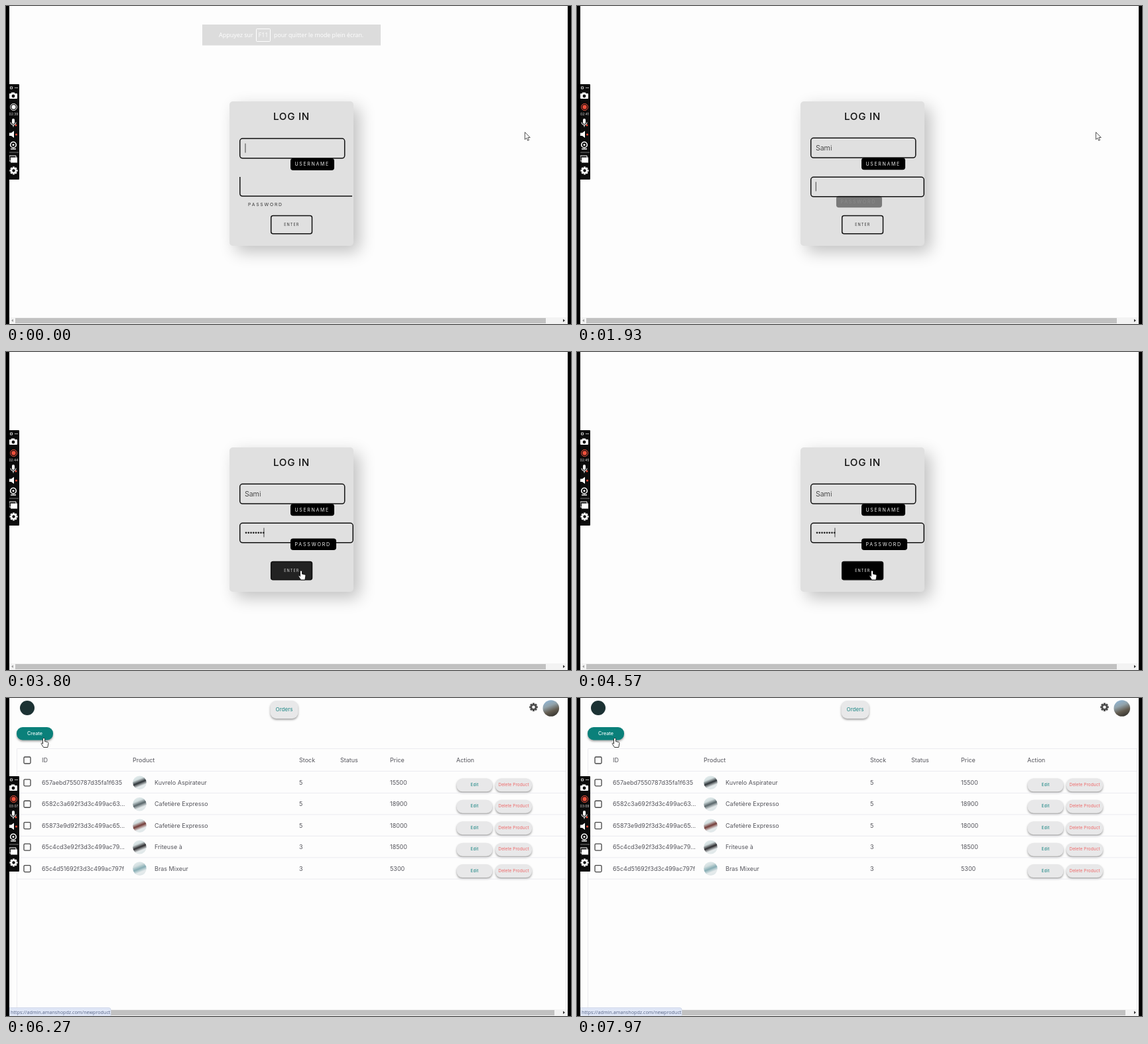
Write an HTML page with a canvas that moves like this. It is 852x480 px and loops after 8000 ms.

```html
<!DOCTYPE html>
<html lang="fr">
<head>
<meta charset="utf-8">
<title>Log in</title>
<style>
  html, body { margin: 0; width: 100%; height: 100%; overflow: hidden; background: #fdfdfd; }
  canvas { display: block; width: 852px; height: 480px; }
</style>
</head>
<body>
<canvas id="stage" width="852" height="480"></canvas>
<script>
const c = document.getElementById('stage').getContext('2d');
const LOOP = 8000, CUT = 5750;
const PAGE = '#fdfdfd', INK = '#111', CARD = '#e0e0e0', PALE = '#e8e8e9', LINE = '#ebebf0';
const SANS = 'Inter, sans-serif', UI = '"Open Sans", sans-serif';
const HAND = new Path2D('M0 0C1.2 0 1.5.8 1.5 1.6V5L5.3 5.9C6.5 6.2 7 7 6.9 8L5.8 14H-.4L-3.6 9C-4.4 7.6-2.8 7-2 8L-1.5 8.7V1.6C-1.5.8-1.2 0 0 0Z');
const ARROW = new Path2D('M0 0V11L2.5 8.7 4.3 12.7 6.1 11.9 4.4 8H7.8Z');

const clamp = v => Math.max(0, Math.min(1, v));
const span = (t, from, to) => clamp((t - from) / (to - from));
const ease = p => p * p * (3 - 2 * p);
const lerp = (a, b, p) => a + (b - a) * p;
const gray = p => { const v = Math.round(255 * p); return `rgb(${v},${v},${v})`; };

function box(x, y, w, h, r, fill, stroke, line = 1) {
  c.beginPath();
  c.roundRect(x, y, w, h, r);
  if (fill) { c.fillStyle = fill; c.fill(); }
  if (stroke) { c.strokeStyle = stroke; c.lineWidth = line; c.stroke(); }
}

function disc(x, y, r, fill, stroke, line = 1) {
  c.beginPath();
  c.arc(x, y, r, 0, 7);
  if (fill) { c.fillStyle = fill; c.fill(); }
  if (stroke) { c.strokeStyle = stroke; c.lineWidth = line; c.stroke(); }
}

// y is the vertical middle of the line
function text(s, x, y, size, color, { weight = 400, align = 'left', gap = 0, family = SANS } = {}) {
  c.font = `${weight} ${size}px ${family}`;
  c.letterSpacing = gap + 'px';
  c.textAlign = align;
  c.textBaseline = 'alphabetic';
  c.fillStyle = color;
  c.fillText(s, x, y + size * .36);
  return c.measureText(s).width;
}

function shape(path, x, y, fill, stroke) {
  c.save();
  c.translate(x, y);
  c.fillStyle = fill;
  c.fill(path);
  c.strokeStyle = stroke;
  c.lineWidth = .9;
  c.stroke(path);
  c.restore();
}

function polygon(fill, ...points) {
  c.beginPath();
  for (let i = 0; i < points.length; i += 2) c.lineTo(points[i], points[i + 1]);
  c.fillStyle = fill;
  c.fill();
}

function shadow(color, blur, dx, dy, draw) {
  c.save();
  Object.assign(c, { shadowColor: color, shadowBlur: blur, shadowOffsetX: dx, shadowOffsetY: dy });
  draw();
  c.restore();
}

function gear(x, y, r, fill, hole) {
  c.save();
  c.translate(x, y);
  c.fillStyle = fill;
  for (let i = 0; i < 4; i++, c.rotate(Math.PI / 4)) c.fillRect(-r * .24, -r, r * .48, r * 2);
  disc(0, 0, r * .76, fill);
  disc(0, 0, r * .36, hole);
  c.restore();
}

function photo(x, y, r, ...tones) {
  const g = c.createLinearGradient(x - r * .4, y - r, x + r * .4, y + r);
  tones.forEach((tone, i) => g.addColorStop(i / (tones.length - 1), tone));
  disc(x, y, r, g);
}

function scrollbar(end) {
  box(5, 470, 842, 10, 0, '#f3f3f3');
  box(14, 471, end - 14, 8, 0, '#c1c1c1');
  polygon('#a0a0a0', 11, 472.5, 11, 477, 8, 474.8);
  polygon('#333', 840, 472.5, 840, 477, 843, 474.8);
}

function toolbar(t) {
  const seconds = t < CUT ? 159 + Math.floor(t * .0015) : 187 + Math.floor((t - 6000) * .0015);
  const clock = '0' + Math.floor(seconds / 60) + ':' + String(seconds % 60).padStart(2, '0');
  const dark = '#0c0c0c', light = '#fff', red = '#f0503c';
  box(4, 118, 16, 144, 1, dark);
  box(6.5, 122, 3, 3, 0, null, light, .8);
  box(13, 123, 5, 1, 0, '#aaa');
  box(5, 132, 12, 8, 1, light);
  box(8, 130.5, 5, 2, 0, light);
  disc(11, 136, 2.4, dark);
  const rec = t < 1000 ? light : red;
  disc(11.5, 152.5, 5, null, rec, 1);
  disc(11.5, 152.5, 3.2, rec);
  text(clock, 11.5, 163.3, 5, '#ddd', { align: 'center' });
  box(9, 170, 4, 8, 2, light);
  c.beginPath();
  c.arc(11, 175.5, 4, 0, Math.PI);
  c.moveTo(11, 179.5);
  c.lineTo(11, 182.5);
  c.strokeStyle = light;
  c.lineWidth = 1.1;
  c.stroke();
  disc(15, 180, 1.4, red);
  polygon(light, 5, 191.5, 8, 191.5, 12, 188.5, 12, 199, 8, 196, 5, 196);
  disc(15.5, 194, 1.5, red);
  disc(11, 209.5, 4.3, null, light, 1.6);
  disc(11, 209.5, 1.5, light);
  box(7, 215, 8, 1.5, 0, light);
  box(5, 220.5, 14, 1, 0, '#777');
  box(5, 226, 10, 8, 0, null, light, 1);
  box(7, 228.5, 10, 8, 0, light);
  gear(11.5, 248.5, 6, light, dark);
}

function caret(x, y, since) {
  if (since % 700 < 350) box(x, y - 7, .9, 14, 0, '#333');
}

function banner(t) {
  c.globalAlpha = 1 - span(t, 0, 260);
  box(296, 28, 269, 31.5, 0, '#dcdcdc');
  text('Appuyez sur', 321, 44, 9, '#fff', { family: UI });
  box(377.5, 34.5, 21, 19, 1, null, '#fff');
  text('F11', 388, 44, 9, '#fff', { family: UI, align: 'center' });
  text('pour quitter le mode plein écran.', 404, 44, 8.8, '#fff', { family: UI });
  c.globalAlpha = 1;
}

function login(t) {
  const focused = t >= 1770;
  const lift = focused ? -.7 : 0;
  const label = ease(span(t, 1770, 2110));
  const hover = ease(span(t, 3620, 3860));

  scrollbar(814);
  shadow('rgba(0,0,0,.24)', 24, 9, 9, () => box(337, 144, 187, 218, 5, CARD));
  text('LOG IN', 430.5, 167 + lift, 15.2, INK, { weight: 500, align: 'center', gap: .7 });

  // username
  box(352.7, 200 + lift, 158, 29.8, 4, null, INK, 1.5);
  const letters = [480, 650, 930, 1100].filter(at => t >= at).length;
  const width = text('Sami'.slice(0, letters), 360, 215 + lift, 10.7, '#222', { weight: 300 });
  if (!focused) caret(360.5 + (letters && width), 214.5, t < 480 ? t : t - 650);
  box(429, 230 + lift, 66, 18, 4, '#000');
  text('USERNAME', 435.5, 238.8 + lift, 7, '#eee', { gap: 1.65 });

  // password
  if (focused) {
    box(352.7, 258.3, 170.5, 29.5, 4, null, INK, 1.5);
  } else {
    c.beginPath();
    c.moveTo(352.8, 258);
    c.lineTo(352.8, 283);
    c.quadraticCurveTo(352.8, 287, 357, 287);
    c.lineTo(522, 287);
    c.strokeStyle = INK;
    c.lineWidth = 1.5;
    c.stroke();
  }
  const dots = clamp((t - 2080) / 960) * 8 | 0;
  for (let i = 0; i < dots; i++) disc(362 + i * 3.75, 272.8, 1.35, '#222');
  if (focused && t < 5150) caret(dots ? 360.5 + dots * 3.5 : 359.8, 272.5, t < 3040 ? t - 1770 : t - 3040);
  const lx = lerp(358.5, 429, label), ly = lerp(300, 290.5, label);
  box(lx, ly - 9, 69, 17.5, 4, `rgba(0,0,0,${label})`);
  text('PASSWORD', lx + 6.5, ly, lerp(6.8, 7.1, label), gray(.2 + label * .75), { gap: 1.8 });

  // submit
  box(399.7, 316.5, 61.8, 27.3, 3, `rgba(0,0,0,${hover})`, INK, 1.5);
  text('ENTER', 430.8, 329.8, 5.5, gray(.2 + hover * .75), { align: 'center', gap: 1.05 });

  banner(t);

  const move = ease(span(t, 2620, 3680));
  const x = lerp(782.5, 445, move), y = lerp(190.5, 330, move);
  if (x < 462 && y > 316) shape(HAND, x, y, '#fff', '#111');
  else shape(ARROW, x, y, '#fff', '#444');
}

function pill(label, x, y, w, h, size, color, fill = PALE, weight = 400) {
  shadow('rgba(0,0,0,.35)', 3, 0, 2, () => box(x, y, w, h, 9, fill));
  text(label, x + w / 2, y + h / 2 - .8, size, color, { align: 'center', weight });
}

function rule(y) {
  c.beginPath();
  c.moveTo(16, y);
  c.lineTo(844, y);
  c.strokeStyle = LINE;
  c.lineWidth = 1;
  c.stroke();
}

const columns = [['ID', 54], ['Product', 191], ['Stock', 442], ['Status', 504], ['Price', 579], ['Action', 679]];
const products = [
  ['657aebd7550787d35fa1f635', 'Kuvrelo Aspirateur', 5, 15500, '#2e3438'],
  ['6582c3a692f3d3c499ac63...', 'Cafetière Expresso', 5, 18900, '#59666a'],
  ['65873e9d92f3d3c499ac65...', 'Cafetière Expresso', 5, 18000, '#743c38'],
  ['65c4cd3e92f3d3c499ac79...', 'Friteuse à', 3, 18500, '#2e2d30'],
  ['65c4d51692f3d3c499ac797f', 'Bras Mixeur', 3, 5300, '#86adb4']
];

function dashboard(t) {
  const arrive = ease(span(t, CUT, 6130));
  const hovering = arrive > .97;
  const ink = '#55555c', teal = '#1c8684';

  disc(32, 15, 11, '#1c3234');
  pill('Orders', 398.5, 4, 42, 27, 8, teal);
  gear(795.5, 13.8, 6.3, '#4c4c4c', PAGE);
  photo(821.8, 15.5, 12.3, '#8fb4d2', '#92a3ab', '#635c50', '#33322e');
  pill('Create', 16, 44, 55, 19.5, 7.2, '#f4ffff', '#0a807a', 500);

  c.strokeStyle = LINE;
  c.lineWidth = 1;
  c.beginPath();
  c.moveTo(16.5, 470);
  c.lineTo(16.5, 76.5);
  c.lineTo(844.5, 76.5);
  c.lineTo(844.5, 470);
  c.stroke();
  rule(110.5);
  box(27, 89, 10, 10, 1.5, null, '#444', 1.3);
  for (const [name, x] of columns) text(name, x, 94, 9, ink);

  products.forEach(([id, name, stock, price, tone], i) => {
    const y = 127.8 + i * 32.45;
    box(27, y - 5, 10, 10, 1.5, null, '#444', 1.3);
    text(id, 54, y, 9, ink);
    photo(201.5, y, 10.3, '#e4edee', '#d3dfe0', tone, '#e6ebec', '#dde6e8');
    text(name, 224, y, 9, ink);
    text(stock, 442, y, 9, ink);
    text(price, 579, y, 9, ink);
    pill('Edit', 679.5, y - 6.5, 54, 20, 6.6, teal);
    pill('Delete Product', 738, y - 6.5, 55, 20, 6.6, '#ee6c6c');
    rule(y + 15.7);
  });

  scrollbar(827);
  if (hovering) {
    box(5, 467.5, 153, 13, [0, 3, 0, 0], '#dfe6f6', '#cdd5e8', .8);
    text('https://admin.amanshopdz.com/newproduct', 7, 474, 7.2, '#566486', { family: UI });
  }
  const x = lerp(445, 57, arrive), y = lerp(330, 60.5, arrive);
  shape(hovering ? HAND : ARROW, x, y, '#fff', '#222');
}

function frame(now) {
  const t = now % LOOP;
  box(0, 0, 852, 480, 0, PAGE);
  (t < CUT ? login : dashboard)(t);
  toolbar(t);
  box(0, 0, 5, 480, 0, '#000');
  box(847, 0, 5, 480, 0, '#000');
  requestAnimationFrame(frame);
}
requestAnimationFrame(frame);
</script>
</body>
</html>
```
